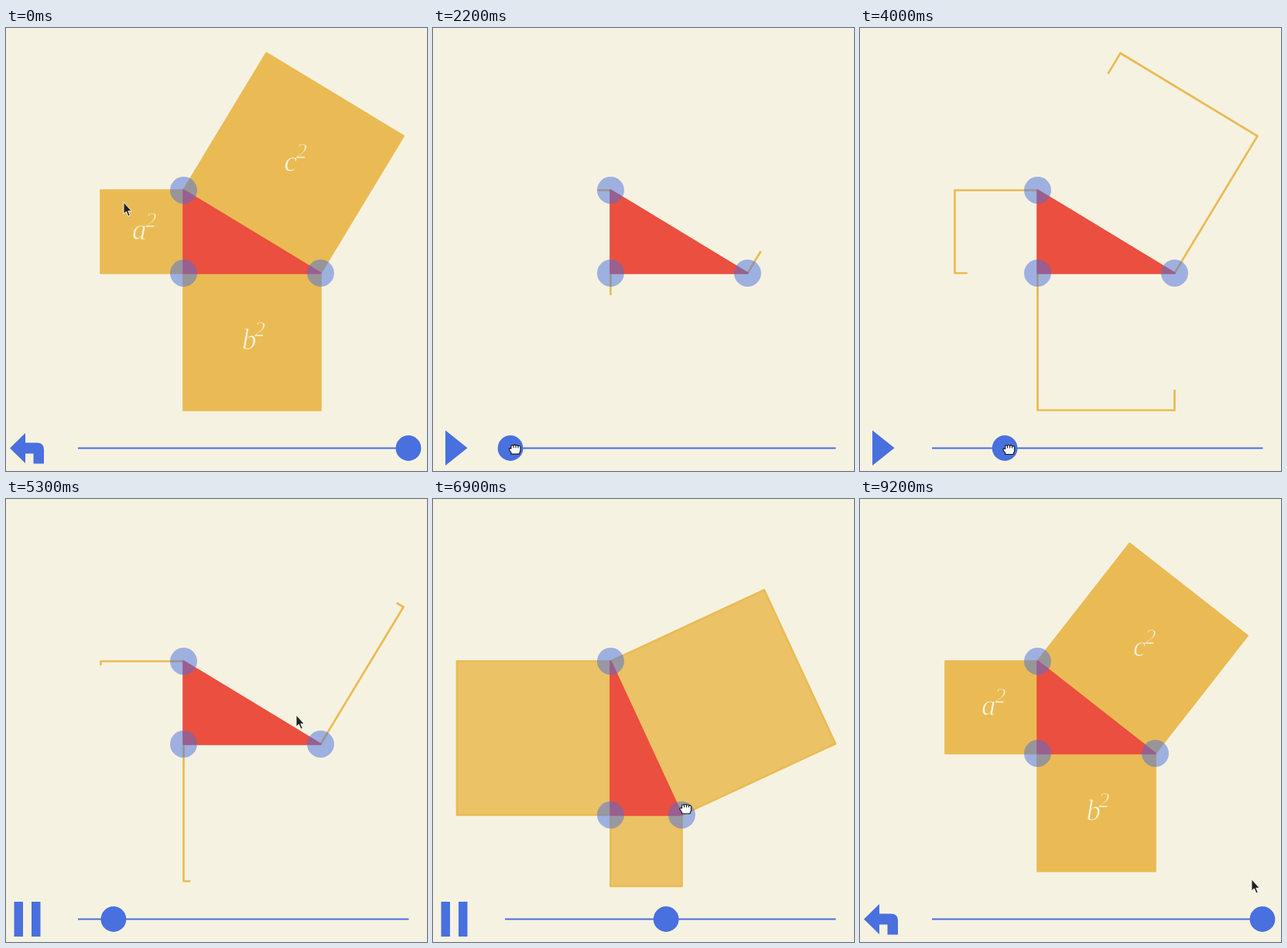
An HTML page for the animation above (9.3 s loop, 544 px wide and 572 px high).

```html
<!DOCTYPE html>
<html lang="en">
<head>
<meta charset="utf-8">
<title>Squares on a right triangle</title>
<style>
html, body { margin: 0; width: 100%; height: 100%; overflow: hidden; background: #f6f2e1; }
svg { display: block; width: 100vw; height: 100vh; }
.square { fill: #eabb54; stroke: #eabb54; stroke-width: 2.7; stroke-linejoin: round; }
.blue { fill: #4870de; }
text { font: italic 37px "Liberation Serif", "Times New Roman", serif; fill: #f8f2df; stroke: #eabb54; stroke-width: .6; }
text.sup { font-size: 28px; }
</style>
</head>
<body>
<svg viewBox="0 0 544 572">
  <rect width="544" height="572" fill="#f6f2e1"/>
  <path id="sqA" class="square" pathLength="4"/>
  <path id="sqB" class="square" pathLength="4"/>
  <path id="sqC" class="square" pathLength="4"/>
  <path id="tri" fill="#eb4f3f" stroke="#eb4f3f" stroke-width="2.6" stroke-linejoin="round"/>
  <g id="labA"><text x="-13" y="10">a</text><text class="sup" x="4.5" y="-6">2</text></g>
  <g id="labB"><text x="-13" y="10">b</text><text class="sup" x="3" y="-7">2</text></g>
  <g id="labC"><text x="-12" y="10">c</text><text class="sup" x="3.5" y="-6.5">2</text></g>
  <g class="blue" fill-opacity=".5">
    <circle id="dotA" r="17.5"/><circle id="dotC" r="17.5"/><circle id="dotR" r="17.5"/>
  </g>
  <path d="M93 542.5H520.5" stroke="#4870de" stroke-width="2.2"/>
  <circle id="knob" class="blue" cy="542.5" r="16.4"/>
  <path id="back" class="blue" d="M5 542.5L25 523V535.5H40Q49 535.5 49 544V562.5H35.5V549.5H25V562Z"/>
  <path id="play" class="blue" d="M16 519.5L44.5 542.3L16 565Z"/>
  <path id="pause" class="blue" d="M10.5 520H22V565H10.5ZM33 520H44.5V565H33Z"/>
  <path id="arrow" d="M0 0V15L3.4 12L6 18L8.3 17L5.8 11.3H10.3Z" fill="#222" stroke="#fff" stroke-width=".9"/>
  <path id="hand" d="M-5 6V4C-8 1 -8.5 -1 -6.5 -1.5L-5 -1V-4C-5 -6 -2 -6 -2 -4.5C-2 -6.5 1 -6.5 1 -4.5C1 -6 4 -6 4 -4C4 -5 7 -5 7 -3V1C7 3 5.5 4 5.5 6ZM-2 -4.5V-2M1 -4.5V-2M4 -4V-2"
    fill="#fff" stroke="#111" stroke-width="1.1" stroke-linejoin="round"/>
</svg>
<script>
const LOOP = 9300, STEP = 100;
const SCRUB = 800, SCRUB_END = 4400, SWING = 3050;
const PLAY = 4847, PLAY_TIME = 4210;
const DRAG = 5600, DROP = 8700, LEAD = 90;
const A = [229.5, 209.5];
const RAIL = { x: 93, y: 542.5, length: 427 };

// Stops are [time, x, y]
const corner = [
  [DRAG, 406.5, 316.5], [6000, 388, 398], [6900, 321.5, 408],
  [7450, 393, 300], [7900, 349.8, 270.5], [DROP, 381.5, 328.5]
];
const pointer = [
  [0, 152, 225], [SCRUB, 528, 542], [SCRUB_END, 100, 542], [4800, 30, 550],
  [5300, 375, 279], [DRAG, 406, 316], [DROP, 381, 328], [9200, 506, 491]
];

const $ = id => document.getElementById(id);
const ramp = (x, from, to) => Math.max(0, Math.min(1, (x - from) / (to - from)));
const ease = u => u * u * (3 - 2 * u);
const poly = pts => "M" + pts.map(p => p.join(" ")).join("L") + "Z";
const set = (id, attrs) => {
  for (const k in attrs) $(id).setAttribute(k, attrs[k]);
};
const show = (id, on) => set(id, { visibility: on ? "visible" : "hidden" });
const place = (id, x, y) => set(id, { transform: `translate(${x} ${y})` });

// Sum of eased moves from stop to stop
function along(stops, t) {
  let [, x, y] = stops[0];
  for (let i = 1; i < stops.length; i++) {
    const [t0, x0, y0] = stops[i - 1], [t1, x1, y1] = stops[i];
    const e = ease(ramp(t, t0, t1));
    x += (x1 - x0) * e;
    y += (y1 - y0) * e;
  }
  return [x, y];
}

const swing = t => 2 * Math.PI * Math.max(0, t - SCRUB) / SWING;

function progress(t) {
  if (t >= PLAY) return ramp(t, PLAY, PLAY + PLAY_TIME);
  return (1 + Math.cos(swing(t))) / 2 * ease(ramp(t, SCRUB_END, 3100));
}

function drawSquares(p, [rx, ry]) {
  const [ax, ay] = A, a = ry - ay, b = rx - ax;
  const shapes = {
    sqA: [A, [ax - a, ay], [ax - a, ry], [ax, ry]],
    sqB: [[ax, ry], [ax, ry + b], [rx, ry + b], [rx, ry]],
    sqC: [[rx, ry], [rx + a, ry - b], [ax + a, ay - b], A]
  };
  const sides = 4 * ramp(p, 0, 0.41);
  for (const id in shapes) {
    set(id, {
      d: poly(shapes[id]),
      "fill-opacity": ramp(p, 0.37, 0.506),
      "stroke-dasharray": sides < 4 ? `${sides} 8` : "none"
    });
    show(id, sides > 0);
  }
  set("tri", { d: poly([A, [ax, ry], [rx, ry]]) });

  place("labA", ax - a / 2, ay + a / 2);
  place("labB", ax + b / 2, ry + b / 2);
  place("labC", ax + (a + b) / 2, ay + (a - b) / 2);
  set("labA", { opacity: ramp(p, 0.51, 0.7) });
  set("labB", { opacity: ramp(p, 0.75, 0.87) });
  set("labC", { opacity: ramp(p, 0.875, 0.99) });

  place("dotA", ax, ay);
  place("dotC", ax, ry);
  place("dotR", rx, ry);
}

function drawCursor(t, knobX) {
  const scrubbing = t >= SCRUB && t < SCRUB_END;
  const dragging = t >= DRAG && t <= DROP;
  let [x, y] = along(pointer, t);
  if (scrubbing) {
    // The grip drifts around the knob
    const s = Math.sin(swing(t));
    [x, y] = [knobX + 8 - 8 * s, RAIL.y + 6.5 * s];
  }
  if (dragging) [x, y] = along(corner, t + LEAD);
  place("hand", x, y);
  place("arrow", x, y);
  show("hand", scrubbing || dragging);
  show("arrow", !scrubbing && !dragging);
}

function draw(t) {
  const p = progress(t);
  const knobX = RAIL.x + RAIL.length * p;
  drawSquares(p, along(corner, t));
  set("knob", { cx: knobX });
  show("back", p === 1);
  show("pause", t >= PLAY && p < 1);
  show("play", t < PLAY && p < 1);
  drawCursor(t, knobX);
}

const start = performance.now();
function tick() {
  const t = (performance.now() - start) % LOOP;
  draw(Math.floor(t / STEP) * STEP);
  requestAnimationFrame(tick);
}
tick();
</script>
</body>
</html>
```
